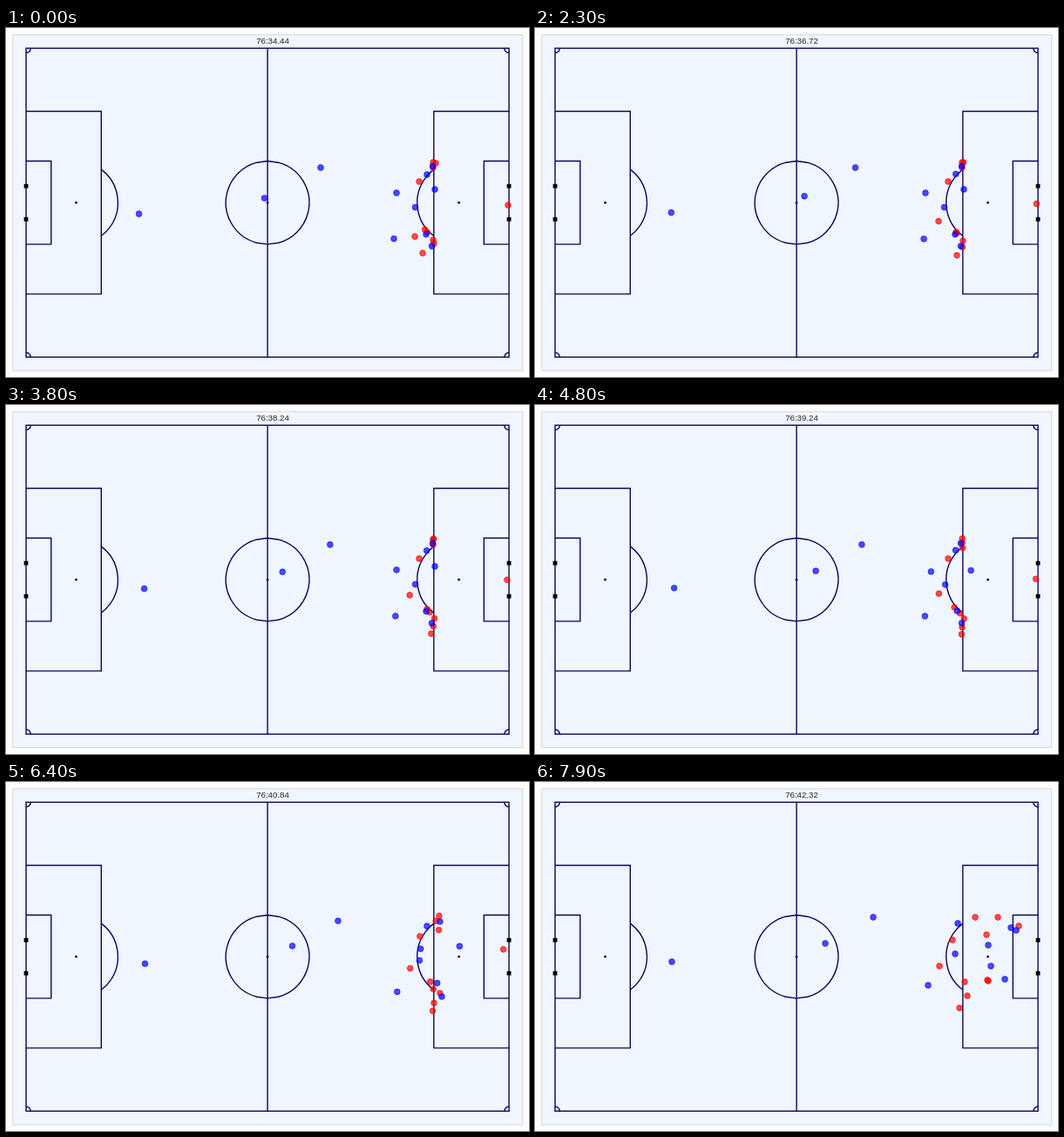
An HTML page with a canvas that plays this animation: 600x400 px, repeating every 8 s.

```html
<!DOCTYPE html>
<html lang="en">
<head>
<meta charset="utf-8">
<title>Match tracking</title>
<style>
  html, body { margin: 0; width: 100%; height: 100%; overflow: hidden; background: #fdfdfe; }
  canvas { display: block; }
</style>
</head>
<body>
<canvas id="stage" width="600" height="400"></canvas>
<script>
const ctx = document.getElementById('stage').getContext('2d');
const LOOP = 8000, STEP = 100, START = 34.44;

// Pitch of 106 by 68 metres, centred on the stage.
const MX = 554 / 106, MY = 354 / 68;
const MIDX = 300.05, MIDY = 200.2;
const LEFT = MIDX - 53 * MX, RIGHT = MIDX + 53 * MX;
const TOP = MIDY - 34 * MY, BOTTOM = MIDY + 34 * MY;

// Moments in seconds: a player starts, reaches a turning point, ends.
const STEADY = [0, 5.7, 7.9], LATE = [3.8, 5.7, 7.9], EARLY = [0, 1.8, 7.9];

// Smooth value through three keys, at rest where the direction flips.
function ease([t0, t1, t2], [a, b, c], t) {
  const s0 = (b - a) / (t1 - t0), s1 = (c - b) / (t2 - t1);
  const turn = s0 * s1 <= 0 ? 0 : 2 * s0 * s1 / (s0 + s1);
  const hermite = (from, to, m0, m1, begin, end) => {
    const h = end - begin, u = Math.min(1, Math.max(0, (t - begin) / h)), v = 1 - u;
    return v * v * ((1 + 2 * u) * from + u * h * m0) +
           u * u * ((1 + 2 * v) * to - v * h * m1);
  };
  return t < t1 ? hermite(a, b, s0, turn, t0, t1) : hermite(b, c, turn, s1, t1, t2);
}

const players = [];
const team = color => (times, ...path) => players.push({
  color, times, xs: path.map(p => p[0]), ys: path.map(p => p[1])
});
const red = team('#f00'), blue = team('#00f');

red(STEADY, [493, 155], [490, 153], [531, 155]);
red(LATE, [490, 154], [490.5, 160], [505, 155]);
red(LATE, [490, 160], [491.5, 167], [518, 175]);
red(STEADY, [474, 176], [474, 176], [479, 181]);
red(STEADY, [576, 203], [574, 198], [555, 165]);
red(EARLY, [469, 239], [463, 223], [464, 211]);
red(LATE, [483, 234], [480, 230], [519, 227]);
red(STEADY, [480.5, 231], [489, 239], [493, 229]);
red(STEADY, [490, 243], [493, 245], [520, 228]);
red(STEADY, [491, 247], [490, 255], [496, 245]);
red(STEADY, [478, 258], [490, 263], [487, 259]);

blue(STEADY, [152.5, 213], [160, 209], [157, 206]);
blue(STEADY, [296.5, 195], [326, 189], [333, 185]);
blue(STEADY, [361, 160], [378, 160], [388, 155]);
blue(LATE, [448, 189], [462, 192], [520, 187]);
blue(STEADY, [445, 241.5], [448, 242], [451, 233]);
blue(LATE, [469.5, 205.5], [472, 206], [482, 197]);
blue(STEADY, [483, 168], [482.5, 166], [485, 162]);
blue(LATE, [489.5, 158.5], [488, 158.5], [546, 167]);
blue(LATE, [492, 185], [509, 192], [552, 170]);
blue(LATE, [482, 236.5], [487, 235], [523, 211]);
blue(LATE, [488.5, 250], [491, 250], [539, 226]);

function dot(x, y, r) {
  ctx.beginPath();
  ctx.arc(x, y, r, 0, 2 * Math.PI);
  ctx.fill();
}

function line(...points) {
  ctx.beginPath();
  points.forEach(([x, y]) => ctx.lineTo(x, y));
  ctx.stroke();
}

// Box open towards the goal line; sizes in metres.
function box(goalX, side, depth, half) {
  const x = goalX + side * depth * MX, top = MIDY - half * MY, bottom = MIDY + half * MY;
  line([goalX, top], [x, top], [x, bottom], [goalX, bottom]);
}

function drawHalf(goalX, side) {
  const spotX = goalX + side * 11 * MX;
  box(goalX, side, 16.5, 20.1);
  box(goalX, side, 5.5, 9.15);
  const reach = Math.acos(5.5 / 9.15), facing = side > 0 ? 0 : Math.PI;
  ctx.beginPath();
  ctx.ellipse(spotX, MIDY, 9.15 * MX, 9.15 * MY, 0, facing - reach, facing + reach);
  ctx.stroke();
  for (const [y, down] of [[TOP, 1], [BOTTOM, -1]]) {
    const inward = Math.atan2(down, side);
    ctx.beginPath();
    ctx.arc(goalX, y, MX, inward - Math.PI / 4, inward + Math.PI / 4);
    ctx.stroke();
  }
  dot(spotX, MIDY, 1.4);
}

function drawPitch() {
  ctx.fillStyle = '#fdfdfe';
  ctx.fillRect(0, 0, 600, 400);
  ctx.fillStyle = '#f0f6ff';
  ctx.fillRect(8, 8, 585, 385);
  ctx.lineWidth = 1;
  ctx.strokeStyle = '#d5d6dc';
  ctx.strokeRect(7.8, 7.8, 585, 385);

  ctx.lineWidth = 1.4;
  ctx.strokeStyle = ctx.fillStyle = '#0a045c';
  ctx.strokeRect(LEFT, TOP, RIGHT - LEFT, BOTTOM - TOP);
  line([MIDX, TOP], [MIDX, BOTTOM]);

  // The centre circle is flattened into chords at top and bottom.
  const chord = Math.PI / 12, quarter = Math.PI / 2, rx = 9.15 * MX, ry = 9.15 * MY;
  ctx.beginPath();
  ctx.moveTo(MIDX, MIDY - ry);
  ctx.ellipse(MIDX, MIDY, rx, ry, 0, chord - quarter, quarter - chord);
  ctx.lineTo(MIDX, MIDY + ry);
  ctx.ellipse(MIDX, MIDY, rx, ry, 0, quarter + chord, 3 * quarter - chord);
  ctx.closePath();
  ctx.stroke();
  dot(MIDX, MIDY, 1.4);

  drawHalf(LEFT, 1);
  drawHalf(RIGHT, -1);
  ctx.fillStyle = '#000';
  for (const x of [LEFT, RIGHT])
    for (const y of [MIDY - 19, MIDY + 19]) ctx.fillRect(x - 2.4, y - 2.4, 4.8, 4.8);
}

function drawPlayer({ color, times, xs, ys }, t) {
  ctx.globalAlpha = 0.7;
  ctx.fillStyle = ctx.strokeStyle = color;
  ctx.lineWidth = 0.8;
  dot(ease(times, xs, t), ease(times, ys, t), 3.4);
  ctx.stroke();
  ctx.globalAlpha = 1;
}

function drawClock(ms) {
  const seconds = START + Math.floor(ms / 40) * 0.04;
  ctx.fillStyle = '#262626';
  ctx.font = '9.7px "Liberation Sans", Arial, sans-serif';
  ctx.textAlign = 'center';
  ctx.fillText('76:' + seconds.toFixed(2), 306, 18);
}

function frame() {
  const ms = Math.floor(performance.now() % LOOP / STEP) * STEP;
  drawPitch();
  players.forEach(p => drawPlayer(p, ms / 1000));
  drawClock(ms);
  requestAnimationFrame(frame);
}
frame();
</script>
</body>
</html>
```
